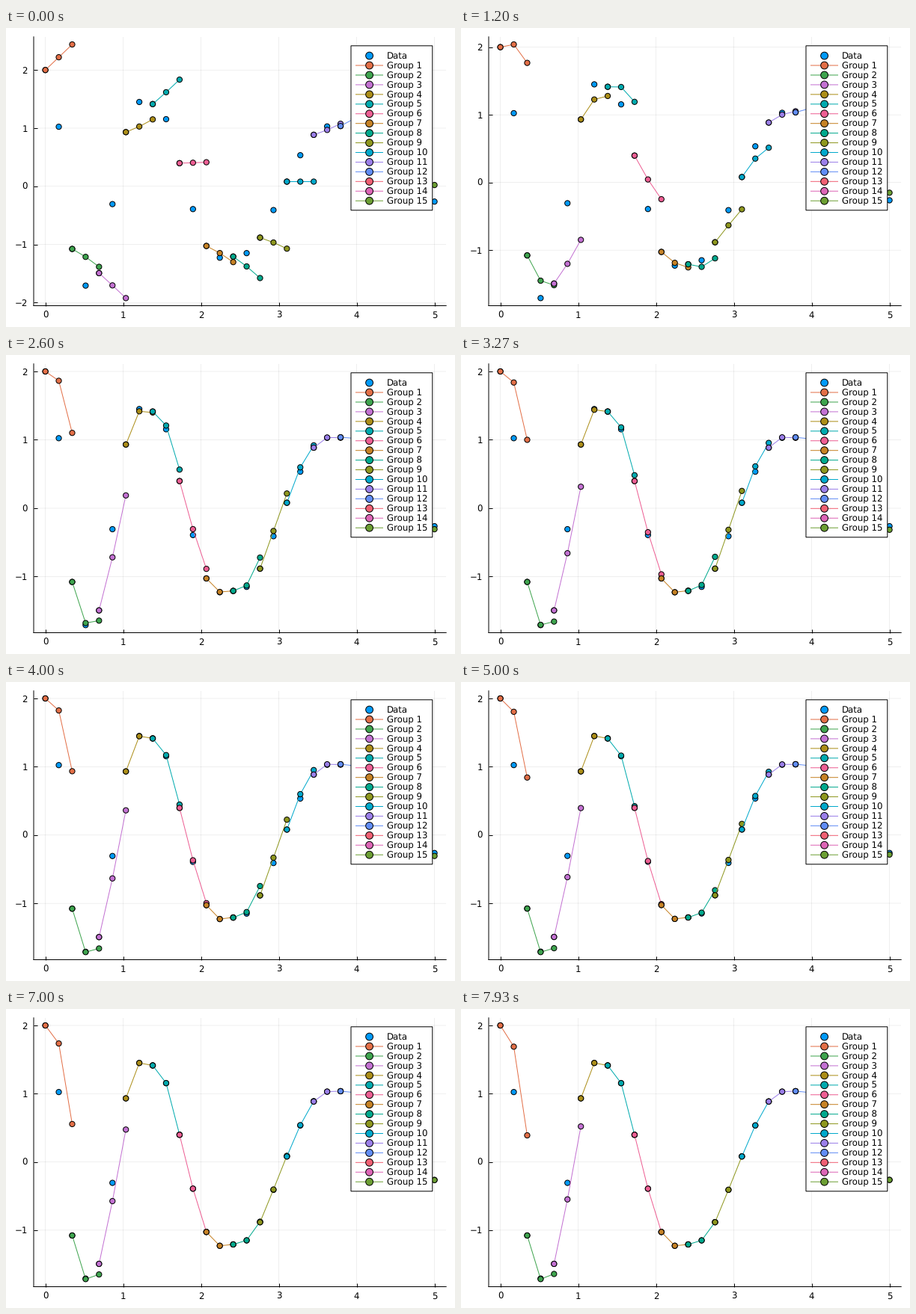
Write a matplotlib script that moves like this. It is 600 px wide and 400 px high and loops after 8 s.

```python
import numpy as np
import matplotlib.pyplot as plt
from matplotlib.animation import FuncAnimation
from matplotlib.patches import Rectangle

W, H, DPI = 600, 400, 100
PX = 72 / DPI
FRAMES, LOOP = 120, 8000
POINTS, GROUPS = 30, 15
FONT = 11.8 * PX
COLORS = ["#009AFA", "#E36F47", "#3EA44E", "#C371D2", "#AC8E18", "#00AAAE",
          "#ED5E93", "#C68225", "#00A98D", "#8E971E", "#00A9CC", "#9B7FE9",
          "#618DF6", "#F06073", "#DD65B6", "#6C9F33"]

plt.rcParams.update({"font.family": "DejaVu Sans", "text.hinting": "none",
                     "path.snap": False})


def spiral(u):
    a, b = u ** 3
    return np.array([-0.1 * a - 2 * b, 2 * a - 0.1 * b])


def solve(end=5.5, n=2200):
    """Integrate the cubic spiral with RK4; return times and first component."""
    h = end / n
    u = np.array([2.0, 0.0])
    out = [u[0]]
    for _ in range(n):
        k1 = spiral(u)
        k2 = spiral(u + h / 2 * k1)
        k3 = spiral(u + h / 2 * k2)
        k4 = spiral(u + h * k3)
        u = u + h / 6 * (k1 + 2 * k2 + 2 * k3 + k4)
        out.append(u[0])
    return np.linspace(0, end, n + 1), np.array(out)


times, wave = solve()
xs = np.linspace(0, 5, POINTS)
data = np.interp(xs, times, wave)


def guess(u, count):
    """Untrained model: each step drifts away from zero."""
    out = [u]
    while len(out) < count:
        out.append(out[-1] + 0.22 * np.tanh(0.58 * out[-1] ** 3))
    return np.array(out)


def fit(g, n):
    """Group g after n training steps: the guess fades into the true curve,
    which is first run too slowly (early groups) or too fast (late ones)."""
    i = 2 * g - 2
    x = xs[i:i + 3]
    learned = np.tanh((n / 28) ** 1.5)
    lag = np.interp(g, [1, 2, 3, 4, 6, 8], [0.5, 0.25, 0.25, 0.05, 0.05, -0.3])
    span = 170 if g < 4 else 70
    speed = 1 - lag * np.exp(-(n / span) ** 3)
    truth = np.interp(x[0] + speed * (x - x[0]), times, wave)
    return x, guess(data[i], len(x)) * (1 - learned) + truth * learned


fig = plt.figure(figsize=(W / DPI, H / DPI), dpi=DPI, facecolor="white")
L, R, T, B = 37.0, 588.19, 11.81, 371.5
ax = fig.add_axes([L / W, 1 - B / H, (R - L) / W, (B - T) / H])
ax.set_xlim(-0.15, 5.15)
ax.set_xticks(range(6))
ax.set_axisbelow(True)
ax.grid(color="black", alpha=0.1, lw=0.6 * PX)
ax.spines[["top", "right"]].set_visible(False)
ax.spines[["left", "bottom"]].set_linewidth(PX)
ax.tick_params(direction="in", length=5 * PX, width=PX, labelsize=FONT)
ax.tick_params(axis="x", pad=7 * PX)
ax.tick_params(axis="y", pad=8 * PX)


def dots(axes, x, y, color, size):
    # One size per point keeps the circles at sub-pixel positions
    return axes.scatter(x, y, s=np.full(len(x), (size * PX) ** 2), c=color,
                        edgecolors="black", linewidths=PX, zorder=3)


dots(ax, xs, data, COLORS[0], 7.2)
curves = []
for g in range(1, GROUPS + 1):
    x, y = fit(g, 0)
    line, = ax.plot(x, y, color=COLORS[g], lw=PX, zorder=3)
    curves.append((line, dots(ax, x, y, COLORS[g], 7.2)))

# Legend laid out in pixels
top = fig.add_axes([0, 0, 1, 1])
top.set_xlim(0, W)
top.set_ylim(H, 0)
top.axis("off")
top.add_patch(Rectangle((461, 23.8), 108.82, 220, fc="white", ec="black", lw=PX))
rows = 37.1 + 12.94 * np.arange(GROUPS + 1)
top.hlines(rows[1:], 467, 504, colors=COLORS[1:], lw=PX)
dots(top, np.full(len(rows), 485.6), rows, COLORS, 9.8)
for k, y in enumerate(rows):
    top.text(509.2, y + 4.2, f"Group {k}" if k else "Data", fontsize=FONT)


def draw(n):
    low, high = data.min(), data.max()
    for g, (line, marks) in enumerate(curves, 1):
        x, y = fit(g, n)
        line.set_ydata(y)
        marks.set_offsets(np.column_stack([x, y]))
        low, high = min(low, y.min()), max(high, y.max())
    pad = 0.03 * (high - low)
    ax.set_yticks(np.arange(np.ceil(low - pad), high + pad))
    ax.set_ylim(low - pad, high + pad)
    return []


anim = FuncAnimation(fig, draw, frames=FRAMES, interval=LOOP / FRAMES,
                     repeat=True, repeat_delay=0, blit=False)
plt.show()
```
